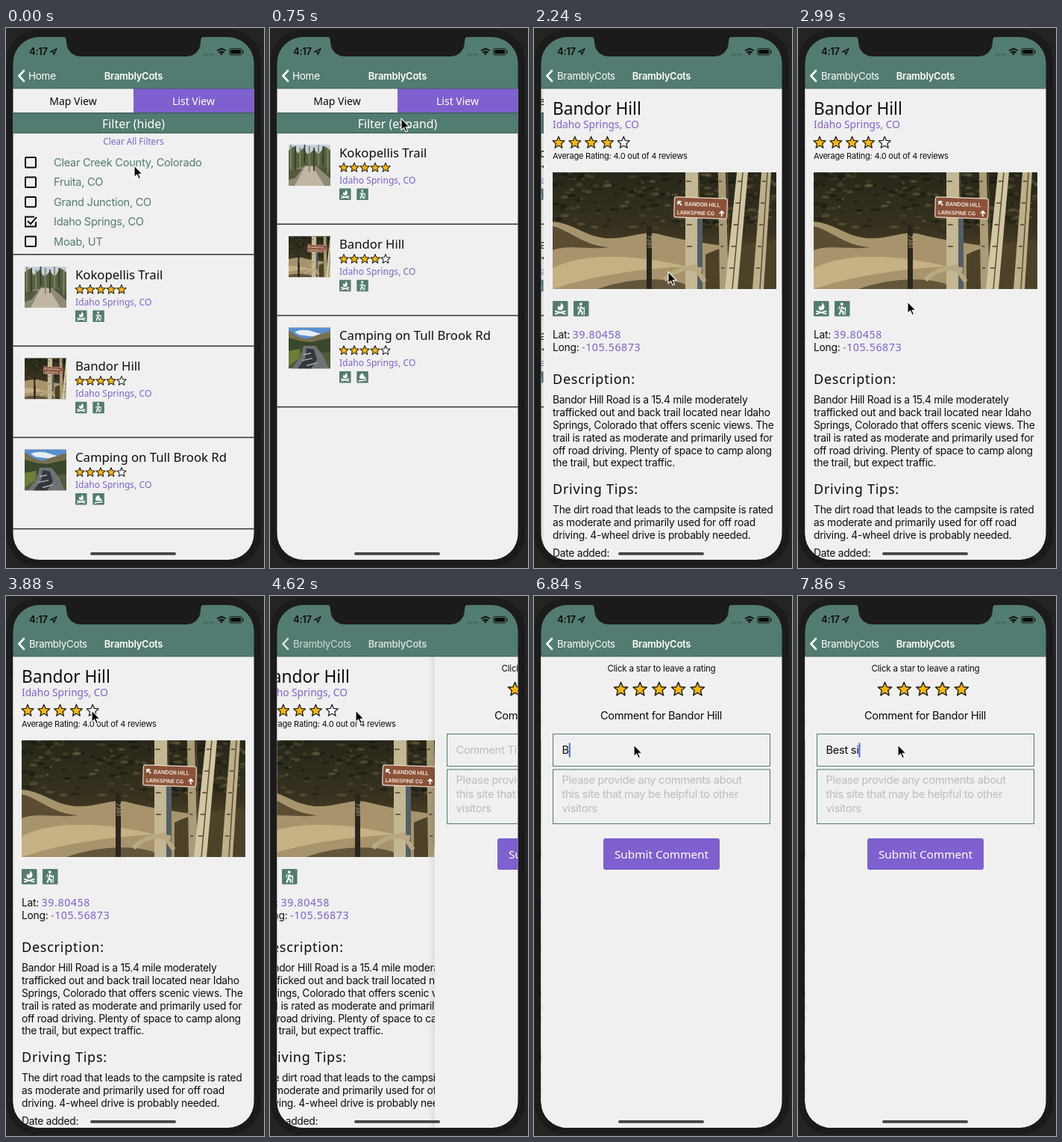
Recreate the animation shown at these times as an HTML page. Size 346 by 722 pixels, loop 8000 ms.

```html
<!DOCTYPE html>
<html lang="en">
<head>
<meta charset="utf-8">
<title>Campsite app</title>
<style>
html, body { margin: 0; height: 100%; overflow: hidden; background: #1b1b1b; }
svg { display: block; }
text { font-family: Inter, sans-serif; letter-spacing: -.019em; white-space: pre; }
.h { font-family: 'Noto Sans', sans-serif; font-weight: 500; letter-spacing: 0; }
.r { font-weight: 400; }
.w { letter-spacing: .042em; }
.m { text-anchor: middle; }
.b { font-weight: 600; }
</style>
</head>
<body>
<script>
const TEAL = '#527b71', PURPLE = '#7e60cf', INK = '#0c0c0c', PAPER = '#f0f0f0', BEZEL = '#1b1b1b', HINT = '#bcbcbe';
const LOOP = 8000, TICK = 148.3, WIDTH = 323;
const APP = 'BramblyCots', SITE = 'Bandor Hill', TOWN = 'Idaho Springs, CO';

// ---- drawing helpers ----
const text = (x, y, s, size, cls = '', fill = INK) =>
  `<text x="${x}" y="${y}" font-size="${size}" class="${cls}" fill="${fill}">${s}</text>`;
const rect = (x, y, w, h, fill, more = '') =>
  `<rect x="${x}" y="${y}" width="${w}" height="${h}" fill="${fill}" ${more}/>`;
const path = (d, fill, more = '') => `<path d="${d}" fill="${fill}" ${more}/>`;
const line = (d, color, width, more = '') => path(d, 'none', `stroke="${color}" stroke-width="${width}" ${more}`);
const group = (id, body, more = '') => `<g id="${id}" ${more}>${body}</g>`;
const times = (n, fn) => Array.from({ length: n }, (_, i) => fn(i)).join('');
const lines = (x, y, step, size, rows, fill) => rows.map((s, i) => text(x, y + i * step, s, size, '', fill)).join('');

let seed = 7;
const random = () => (seed = seed * 16807 % 2147483647) / 2147483647;

function star(cx, cy, r, full) {
  const points = times(10, i => {
    const a = i * Math.PI / 5, d = i % 2 ? r * .45 : r;
    return `${(cx + d * Math.sin(a)).toFixed(1)},${(cy - d * Math.cos(a)).toFixed(1)} `;
  });
  return `<polygon points="${points}" fill="${full ? '#f9b60d' : '#f8f8f8'}" stroke="#1c1c1c" stroke-width="${r / 8 + .2}" stroke-linejoin="round"/>`;
}
const stars = (x, y, step, r, score) => times(5, i => star(x + i * step, y, r, i < score));

const GLYPHS = {
  fire: path('M11 2C15 6 15 9 12 12H8C5 9 7 7 8 6L9 8C11 6 11 4 11 2Z', '#fff') +
    line('M3 13L17 17M17 13L3 17', '#fff', 1.8),
  hike: '<circle cx="9.5" cy="4" r="1.9" fill="#fff"/>' +
    line('M9.5 7L8.5 12L11 14L11.5 18M8.5 12L6 18M9.5 7.5L13 10.5', '#fff', 2) +
    line('M14 8V18M6.5 7L5.8 11', '#fff', 1.2),
  drive: path('M5 13V8L8 4H11L13 9L16 11V13Z', '#fff') + line('M3 17L17 15', '#fff', 2)
};
const icon = (name, x, y, size) =>
  `<g transform="translate(${x} ${y}) scale(${size / 20})">${rect(0, 0, 20, 20, TEAL, 'rx="1"')}${GLYPHS[name]}</g>`;

// ---- pictures ----
const leaves = times(230, () => {
  const x = random() * 300, y = random() * 75, c = ['#14150e', '#4f4a2c', '#66603a', '#1e2015'][random() * 4 | 0];
  return `<ellipse cx="${x.toFixed()}" cy="${y.toFixed()}" rx="${(2 + random() * 5).toFixed(1)}" ry="2" fill="${c}" opacity=".55"/>`;
});
const birch = (x, w, lean, color) => path(`M${x} 0h${w}l${lean} 156h${-w - 2}z`, color) +
  line(`M${x + w + lean / 2} 0l${lean} 156`, '#5b4d36', 1.5) +
  times(5, i => line(`M${x + lean * i / 5 + 1} ${12 + i * 29}h${w * .4}`, '#4a4030', 1.5));
const hillPhoto = rect(0, 0, 300, 156, 'url(#wood)') + leaves +
  path('M0 66C28 68 40 84 70 88C100 90 118 78 140 82C190 96 250 98 300 112V156H0Z', '#a8946c') +
  path('M0 72C25 78 40 98 76 100C50 104 20 96 0 104Z', '#5c4c33') +
  path('M0 128C50 104 120 112 180 126C130 128 60 136 0 156Z', '#c6b184') +
  path('M60 156C110 138 170 140 190 156Z', '#62553b') +
  path('M205 110C240 92 280 96 300 90V156H205Z', '#4c4228') +
  birch(178, 17, 2, '#c3b893') + birch(222, 10, 4, '#a99c76') + birch(247, 15, -14, '#d1c6a2') + birch(280, 13, -10, '#bdb089') +
  rect(194, 58, 7, 98, '#526066') + rect(126, 71, 7, 85, '#2b261c') +
  '<text transform="translate(127 84) rotate(90)" font-size="8" fill="#b9ad8a">7391</text>' +
  line('M150 144C165 128 178 130 190 126L204 146M180 128L200 130', '#b9a981', 6) +
  `<g transform="rotate(2 198 48)">${rect(163, 34, 71, 27, '#8b5238', 'rx="3" stroke="#e8dccb" stroke-width="1.2"')}
   ${text(177, 45.5, SITE.toUpperCase(), 7.3, 'b', '#f4ece0')}${text(167, 57, 'LARKSPINE CG', 7.1, 'b', '#f4ece0')}
   ${line('M173 45L168 40M168 44V40H172M227 58V51M224 54L227 51L230 54', '#fff', 1.7)}</g>`;

const trailPhoto = rect(0, 0, 56, 56, '#64714f') + rect(0, 0, 56, 12, '#c3d2da') +
  path('M0 8L7 2L12 12L20 4L26 15L34 6L40 14L48 2L56 8V34H0Z', '#53633f') +
  path('M0 34L22 30L36 29L56 34V56H0Z', '#8f8a76') + path('M22 29H32L48 56H8Z', '#c0b6a2') +
  path('M0 33H18L9 45L0 48Z', '#525b3b') + path('M38 30L56 32V46Z', '#4c5638') +
  times(9, i => rect(2 + i * 6.2, i % 3 * 2, 1.8, 35 - i % 4 * 3, i % 2 ? '#3c392a' : '#89806a'));

const creekPhoto = rect(0, 0, 56, 56, '#4e5c38') + rect(0, 0, 56, 20, '#5b8fd0') +
  path('M8 6Q20 1 34 6T52 8L38 13L14 10Z', '#e6edf4') +
  path('M0 4L12 12L24 16L36 11L56 5V28H0Z', '#756f4b') + path('M0 14L18 19L30 20L56 14V34H0Z', '#39472b') +
  path('M20 25H36L46 38L54 56H4L16 40Z', '#6f7275') + path('M24 28L34 30L38 44L30 56H12L22 42Z', '#33373c') +
  path('M0 32L16 29L14 42L0 52Z', '#6d7f3a') + line('M20 37L30 35M18 45L32 42M24 52L38 48', '#aab2b8', 1.4);

// ---- pages ----
function row(i, name, score, picture, icons, viewBox) {
  const y = 303 + i * 122.2;
  return group('row' + i,
    `<svg x="25" y="${y + 16}" width="56" height="55" viewBox="${viewBox || '0 0 56 56'}" preserveAspectRatio="none">${picture}</svg>` +
    text(93, y + 32.5, name, 16.7, 'h') + stars(99, y + 46.8, 14, 6.5, score) +
    text(93, y + 67.5, TOWN, 12.1, 'h r', PURPLE) +
    icons.map((n, k) => icon(n, 93 + k * 23.3, y + 74.5, 15.5)).join('') +
    rect(9, y + 121.5, 324, 1.5, '#333'));
}
const places = ['Clear Creek County, Colorado', 'Fruita, CO', 'Grand Junction, CO', 'Idaho Springs, CO', 'Moab, UT'];
const filters = text(171, 155.5, 'Clear All Filters', 11.7, 'h r m', PURPLE) +
  places.map((name, i) => {
    const y = 179.8 + i * 26.4;
    const box = i === 3
      ? line(`M38 ${y - 6.5}H26V${y + 6.5}H40V${y}M29 ${y - 1}L33 ${y + 3}L41 ${y - 6}`, INK, 2)
      : rect(26, y - 6.7, 14, 13.4, 'none', `rx="1" stroke="${INK}" stroke-width="2"`);
    return box + text(64, y + 5.2, name, 14.6, '', TEAL);
  }).join('') + rect(9, 302, 324, 1.5, '#333');

const listPage = rect(9, 81, WIDTH + 1, 630, PAPER) +
  rect(171, 81, 162, 32, PURPLE) +
  text(90, 102.7, 'Map View', 14, 'h m') + text(251.5, 102.7, 'List View', 14, 'h m', '#fff') +
  rect(9, 113, 324, 28, '#41605a') + rect(9, 114.5, 324, 25.5, TEAL) +
  '<text id="toggle" x="171" y="133.5" font-size="15.9" class="h m" fill="#fff"></text>' +
  group('filters', filters) +
  group('rows', row(0, 'Kokopellis Trail', 5, trailPhoto, ['fire', 'hike']) +
    row(1, SITE, 4, hillPhoto, ['fire', 'hike'], '92 0 156 156') +
    row(2, 'Camping on Tull Brook Rd', 4, creekPhoto, ['fire', 'drive']));

const value = s => `<tspan class="h r w" font-size="14.2" fill="${PURPLE}">${s}</tspan>`;
const detailPage = rect(-1, 81, 10, 630, 'url(#shade)') + rect(9, 81, WIDTH + 1, 630, PAPER) +
  text(21, 116, SITE, 22.7, 'h') + text(21, 134, TOWN, 13.7, 'h r', PURPLE) +
  stars(29, 153.5, 21.8, 8.4, 4) +
  text(21, 175, 'Average Rating: 4.0 out of 4 reviews', 11) +
  `<svg x="21" y="193" width="300" height="156">${hillPhoto}</svg>` +
  icon('fire', 21, 365, 20.5) + icon('hike', 49, 365, 20.5) +
  text(21, 414.5, 'Lat: ' + value('39.80458'), 13.8) + text(21, 431.5, 'Long: ' + value('-105.56873'), 13.8) +
  text(21, 476, 'Description:', 18, 'h w') +
  lines(21, 502.3, 16.8, 13.8, [SITE + ' Road is a 15.4 mile moderately', 'trafficked out and back trail located near Idaho',
    'Springs, Colorado that offers scenic views. The', 'trail is rated as moderate and primarily used for',
    'off road driving. Plenty of space to camp along', 'the trail, but expect traffic.']) +
  text(21, 623, 'Driving Tips:', 18, 'h w') +
  lines(21, 649.3, 16.8, 13.8, ['The dirt road that leads to the campsite is rated',
    'as moderate and primarily used for off road', 'driving. 4-wheel drive is probably needed.']) +
  text(21, 707, 'Date added:', 13.8);

const frameLine = `stroke="${TEAL}" stroke-width="1"`;
const commentPage = rect(-1, 81, 10, 630, 'url(#shade)') + rect(9, 81, WIDTH + 1, 630, PAPER) +
  text(171, 100.5, 'Click a star to leave a rating', 11.6, 'm') + stars(116.5, 125, 25.7, 9.7, 5) +
  text(170.5, 165, 'Comment for ' + SITE, 14.6, 'm') +
  rect(25.5, 184.5, 291, 43, 'none', frameLine) + rect(25.5, 232, 291, 72.5, 'none', frameLine) +
  '<text id="entry" x="37.5" y="211" font-size="14.6"></text>' +
  rect(37.5, 196.5, 2, 19, '#4468e4', 'id="caret"') +
  lines(37.5, 251.3, 18.6, 14.6, ['Please provide any comments about', 'this site that may be helpful to other', 'visitors'], HINT) +
  rect(93, 324, 156, 42, PURPLE, 'rx="3"') + text(171, 351, 'Submit Comment', 15.3, 'h m', '#fff');

// ---- phone ----
const header = rect(9, 12, 324, 69, TEAL) + rect(9, 80.5, 324, .8, '#41605a') +
  group('bar', line('M24 57L17.5 64L24 71', '#fff', 2.6, 'stroke-linecap="round"') +
    text(171, 68.6, APP, 13, 'b m', '#fff') +
    `<g id="home">${text(30, 68.7, 'Home', 13.5, '', '#fff')}</g><g id="back">${text(31, 68.7, APP, 13.3, '', '#fff')}</g>`);
const status = path('M76 11q5 1 5 6v1c0 12 8 20 20 20h140c12 0 20-8 20-20v-1q0-5 5-6z', BEZEL) +
  text(31, 36, '4:17', 13, 'b') + line('M59.5 32L68 27.5L64 36V32Z', INK, 1.2) +
  times(4, i => `<circle cx="${266 + i * 4}" cy="35.5" r="1.2" fill="#33504a" opacity=".7"/>`) +
  line('M283.5 30.5Q289 25.5 294.500 30.5M285.500 33Q289 30 292.500 33', INK, 1.9) + path('M289 36.5L287 34Q289 32.700 291 34Z', INK) +
  rect(299.5, 27.5, 17, 8.5, 'none', `rx="2.3" stroke="${INK}" stroke-width=".8"`) +
  rect(301, 29, 14, 5.5, INK, 'rx="1"') + rect(317.5, 30, 1.2, 3.5, INK);

document.body.innerHTML = `<svg width="346" height="722" viewBox="0 0 346 722">
<defs>
  <linearGradient id="wood" x2="0" y2="1"><stop stop-color="#27271a"/><stop offset=".5" stop-color="#38321f"/><stop offset="1" stop-color="#6d5d40"/></linearGradient>
  <linearGradient id="shade"><stop stop-opacity="0"/><stop offset="1" stop-opacity=".07"/></linearGradient>
  <clipPath id="screen"><rect x="9.500" y="12" width="323" height="699" rx="35"/></clipPath>
</defs>
${rect(0, 0, 346, 722, '#242424')}${rect(1, 2, 341, 718, BEZEL, 'rx="42"')}
<g clip-path="url(#screen)">${group('list', listPage)}${group('detail', detailPage)}${group('comment', commentPage)}
${header}${status}${rect(113, 701, 115, 3.8, '#444', 'rx="1.9"')}</g>
${group('cursor', path('M0 0V15.500L3.600 12.200L6 17.800L8.500 16.700L6.100 11.300H11Z', '#000', 'stroke="#fff" stroke-width="1.1"'))}
</svg>`;

// ---- motion ----
const $ = id => document.getElementById(id);
const shift = (id, x, y = 0) => $(id).setAttribute('transform', `translate(${x} ${y})`);
const fade = (id, opacity) => $(id).setAttribute('opacity', opacity);
const slide = (t, start) => t < start ? 0 : 1 - Math.exp((start - t) / 86);

// tick, x, y of the pointer tip
const route = [[0, 172, 184], [2, 175, 128], [5, 176, 121], [6, 179, 180], [7, 182, 267], [8, 219, 411], [9, 219, 411],
  [11, 180, 326], [17, 180, 326], [20, 147, 366], [21, 13, 470], [22, 160, 690], [23, 327, 560], [24, 200, 300],
  [25, 115, 153], [31, 115, 153], [34, 134, 199], [99, 134, 199]];

function pointer(n) {
  const i = route.findIndex(k => k[0] > n), [a, x, y] = route[i - 1], [b, u, v] = route[i];
  const f = (n - a) / (b - a);
  return [x + (u - x) * f, y + (v - y) * f];
}

function draw(n) {
  const t = n * TICK, open = n < 4;
  const toDetail = slide(t, 1845), toComment = slide(t, 4561);

  $('toggle').textContent = open ? 'Filter (hide)' : 'Filter (expand)';
  fade('filters', open ? 1 : 0);
  shift('rows', 0, open ? 0 : -163);
  fade('row1', n === 12 || n === 13 ? .65 : 1);

  shift('list', Math.round(-.3 * WIDTH * toDetail));
  shift('detail', Math.round((1 - toDetail) * (WIDTH + 10) - .3 * WIDTH * toComment));
  shift('comment', Math.round((1 - toComment) * (toComment ? WIDTH : WIDTH + 20)));
  fade('home', 1 - toDetail);
  fade('back', toDetail);
  fade('bar', 1 - 1.2 * toComment * (1 - toComment));

  const typed = 'Best si'.slice(0, Math.max(0, Math.min(n - 45, 5)) + Math.max(0, n - 51));
  const entry = $('entry');
  entry.textContent = typed || 'Comment Title';
  entry.setAttribute('fill', typed ? INK : HINT);
  $('caret').setAttribute('x', 37.5 + (typed ? entry.getComputedTextLength() : 0));
  fade('caret', n < 36 || n === 41 || n === 42 ? 0 : n === 40 ? .4 : 1);

  shift('cursor', ...pointer(n));
}

const begin = performance.now();
function loop() {
  draw(Math.floor((performance.now() - begin) % LOOP / TICK));
  requestAnimationFrame(loop);
}
loop();
</script>
</body>
</html>
```
